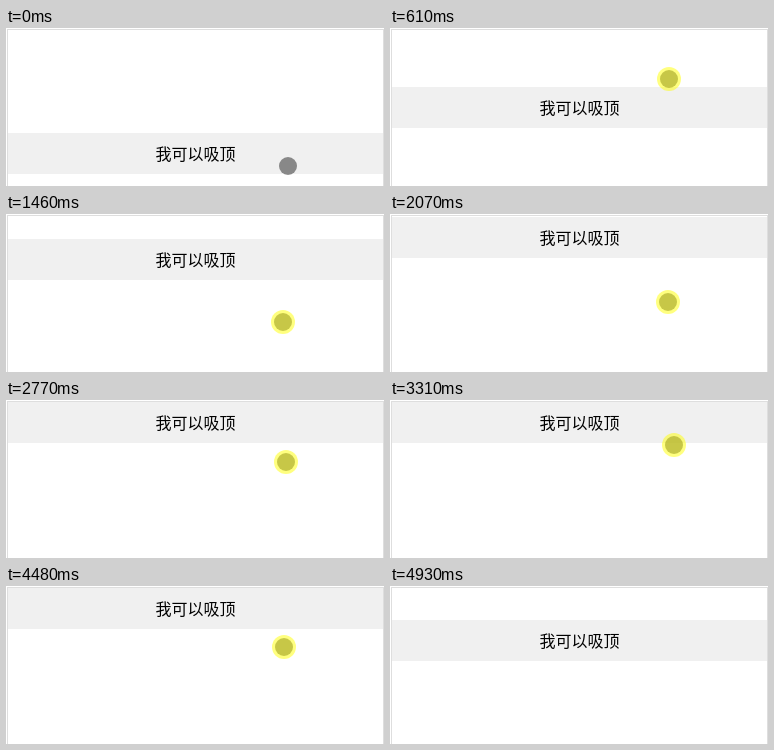
Recreate the animation shown at these times as an HTML page. Size 378 by 158 pixels, loop 5.33 s.

```html
<!DOCTYPE html>
<html lang="zh-CN">
<head>
<meta charset="utf-8">
<title>吸顶</title>
<style>
  html, body {
    margin: 0;
    width: 100%;
    height: 100%;
    overflow: hidden;
    background: #fff;
  }
  .stage {
    position: relative;
    width: 378px;
    height: 158px;
    overflow: hidden;
  }
  .page {
    position: absolute;
    inset: 1px 0 -2px 1px;
    border: 1px solid #dedede;
  }
  .bar {
    position: absolute;
    left: 2px;
    top: 0;
    width: 375px;
    height: 41px;
    background: #f0f0f0;
    color: #000;
    font: 300 16px/41px "Noto Sans CJK SC", "Noto Sans CJK", sans-serif;
    text-align: center;
    white-space: nowrap;
  }
  .pointer {
    position: absolute;
    left: -9.3px;
    top: -9.3px;
    width: 18.6px;
    height: 18.6px;
    border-radius: 50%;
    background: rgba(32, 32, 32, .5);
  }
  .pointer.down::after {
    content: "";
    position: absolute;
    inset: -3px;
    border-radius: 50%;
    background: rgba(255, 255, 0, .5);
  }
</style>
</head>
<body>
<div class="stage">
  <div class="page"></div>
  <div class="bar">我可以吸顶</div>
  <div class="pointer"></div>
</div>
<script>
  const LOOP = 5330, STEP = 77, LEAD = 10, LAST = 64;
  const STICKY_TOP = 2, DRAG = 1.1;
  const bar = document.querySelector(".bar");
  const pointer = document.querySelector(".pointer");

  // Turning points of the hand: step, x, y.
  const path = [
    [0, 282, 138], [4, 281, 93], [9, 279, 40.5], [10, 281, 25],
    [14, 279, 129], [15, 277, 128], [21, 277, 98], [27, 278, 88],
    [32, 278, 83], [41, 282, 36], [43, 284, 45], [49, 282, 86],
    [52, 279, 126], [55, 280, 24], [56, 278, 28], [63, 278, 143]
  ];
  // Each drag takes hold of the page at a scroll position.
  const drags = [
    { from: 4, to: 9, scroll: 105 },
    { from: 15, to: 42, scroll: 47 },
    { from: 43, to: 51, scroll: -72 },
    { from: 56, to: 63, scroll: -93 }
  ];

  function pointAt(step) {
    const next = path.findIndex(([s]) => s > step);
    if (next < 0) return path.at(-1).slice(1);
    const [s0, x0, y0] = path[next - 1];
    const [s1, x1, y1] = path[next];
    const part = (step - s0) / (s1 - s0);
    return [x0 + (x1 - x0) * part, y0 + (y1 - y0) * part];
  }

  function barTop(step) {
    const { from, to, scroll } = drags.findLast(d => d.from <= step) || drags[0];
    const held = Math.min(Math.max(step, from), to);
    const moved = pointAt(held)[1] - pointAt(from)[1];
    return Math.max(STICKY_TOP, scroll + DRAG * moved);
  }

  function draw() {
    const time = performance.now() % LOOP;
    const step = Math.min(LAST, Math.floor((time + LEAD) / STEP));
    const [x, y] = pointAt(step).map(Math.round);
    bar.style.transform = `translateY(${Math.round(barTop(step))}px)`;
    pointer.style.transform = `translate(${x}px, ${y}px)`;
    pointer.classList.toggle("down", drags.some(d => step >= d.from && step <= d.to));
    pointer.style.visibility = step < LAST ? "visible" : "hidden";
    requestAnimationFrame(draw);
  }
  draw();
</script>
</body>
</html>
```
